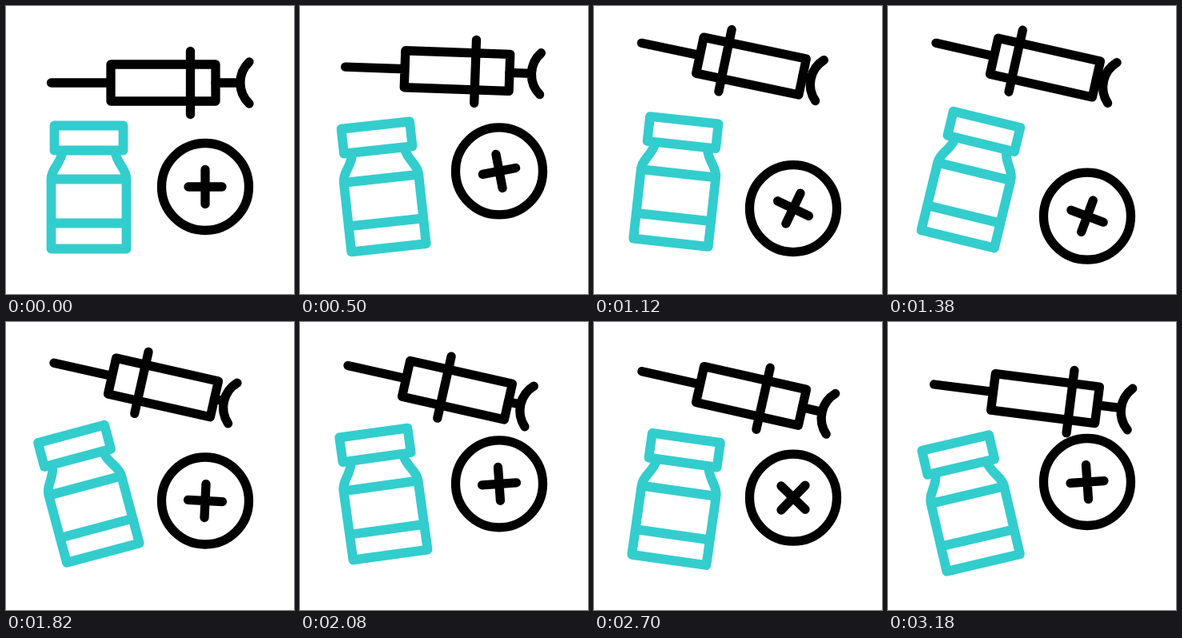
Animation, 360 px wide and 360 px high, one loop 3.2 s. Source, as an HTML page:

```html
<!DOCTYPE html>
<html lang="en">
<head>
<meta charset="utf-8">
<title>Vaccine icon</title>
<style>
  html, body { margin: 0; width: 100%; height: 100%; overflow: hidden; background: #fff; }
  svg { display: block; width: 100vw; height: 100vh; }
  g { fill: none; stroke: #000; stroke-width: 11.3; stroke-linecap: round; stroke-linejoin: round; }
  #bottle { stroke: #33cdce; stroke-width: 11.8; }
</style>
</head>
<body>
<svg viewBox="0 0 360 360">
  <!-- each part is drawn around its own pivot -->
  <g id="bottle">
    <path d="M-43 -85h86v31h-86z"/>
    <path d="M-33 -52Q-34 -45 -41 -34Q-47 -25 -47 -18V69H47V-18Q47 -25 41 -34Q34 -45 33 -52M-47 -18H47M-47 37H47"/>
  </g>
  <g id="syringe">
    <path d="M-140 0H-65.500M-65.500 -23h131v46h-131z"/>
    <path id="flange" d="M34 -39.500V39.500"/>
    <path id="plunger"/>
  </g>
  <g id="badge">
    <circle r="54.500"/>
    <path id="plus" d="M-21 0H21M0 -21.500V21.500"/>
  </g>
</svg>
<script>
const LOOP = 3200, START = 220, PEAK = 1300, END = 3420;
const $ = id => document.getElementById(id);
const move = (id, x, y, angle = 0) =>
  $(id).setAttribute('transform', `translate(${x} ${y}) rotate(${angle})`);

// Sine-eased 0 to 1 between times a and b
const ramp = (t, a, b) =>
  (1 - Math.cos(Math.PI * Math.min(1, Math.max(0, (t - a) / (b - a))))) / 2;

// Rises from a to b, falls back from b to c
const hump = (t, a, b, c) => ramp(t, a, b) - ramp(t, b, c);

// Rocks between alternating sides, one side per step, first towards sign
function sway(t, start, step, count, sign) {
  let sum = 0;
  for (let i = 0; i < count; i++, start += step, sign = -sign)
    sum += sign * hump(t, start, start + step, start + 2 * step);
  return sum;
}

function draw(t) {
  move('bottle', 103.5,
    234.5 - 12.5 * hump(t, START, 1850, END),
    15 * (sway(t, 270, 520, 3, -1) + sway(t, 2510, 365, 2, 1)));

  move('syringe', 196.5,
    96 - 22.3 * hump(t, START, 680, END),
    12.7 * (ramp(t, START, PEAK) - ramp(t, 2980, END)));
  const slide = -72 * hump(t, START, PEAK, END);
  const end = 96.5 + 0.3 * slide;
  move('flange', slide, 0);
  $('plunger').setAttribute('d', `M65.5 0H${end}M${end + 11} -26a36 36 0 0 0 0 52`);

  move('badge', 249,
    226 - 26 * ramp(t, START, 640) + 64 * hump(t, 640, PEAK, 2190) + 20 * hump(t, 2300, 2740, 3180));
  move('plus', 0, 0,
    -69 * ramp(t, START, PEAK) - 25 * ramp(t, PEAK, 2100) - 90 * ramp(t, 2320, 3120));
}

const start = performance.now();
function frame() {
  draw((performance.now() - start) % LOOP);
  requestAnimationFrame(frame);
}
frame();
</script>
</body>
</html>
```
